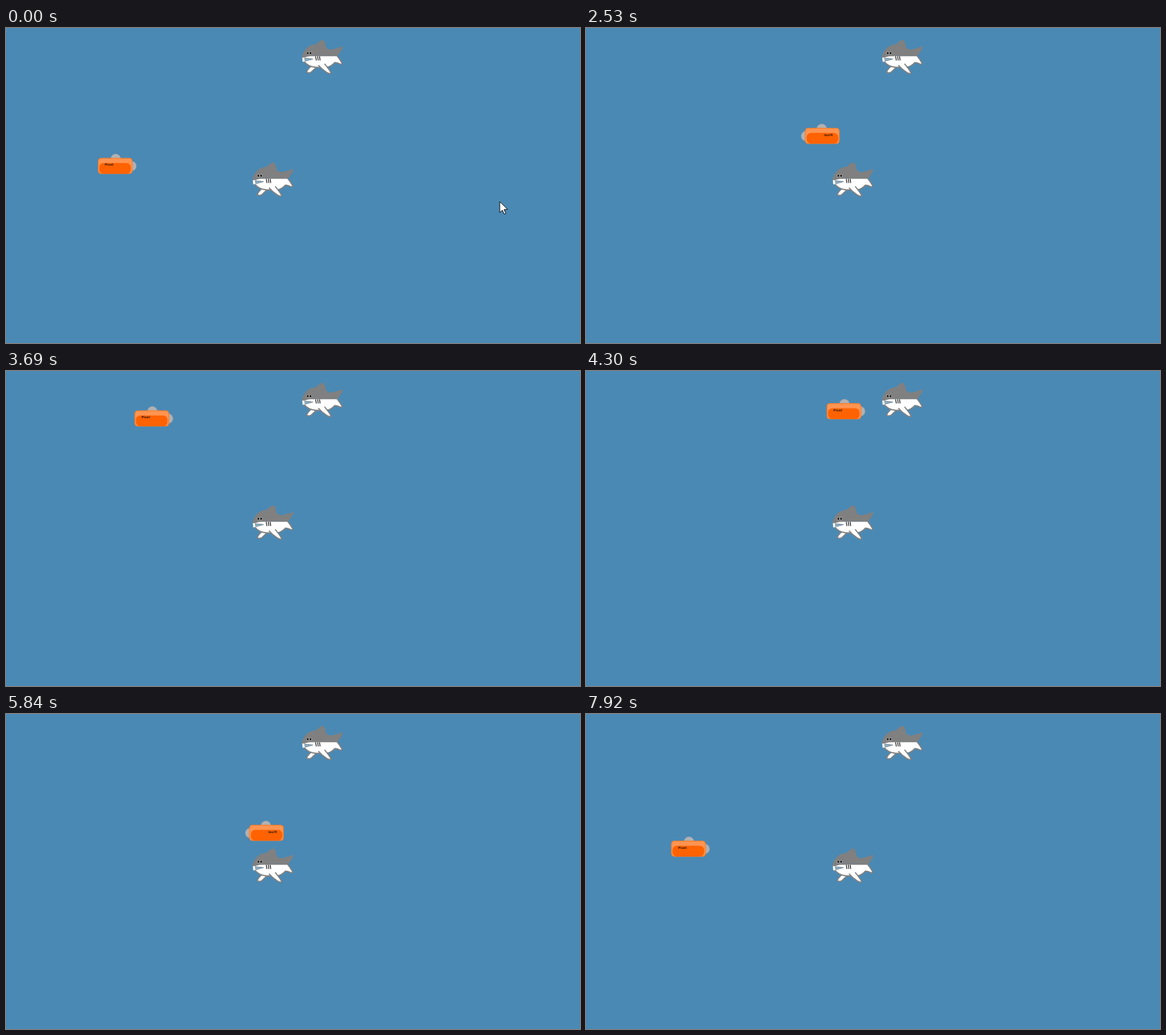
Recreate the animation shown at these times as an HTML page. Size 837x460 px, loop 7990 ms.

```html
<!DOCTYPE html>
<html lang="en">
<head>
<meta charset="utf-8">
<title>Submarine and sharks</title>
<style>
  html, body { margin: 0; width: 100%; height: 100%; overflow: hidden; background: #4a89b4; }
  svg { display: block; width: 837px; height: 460px; }
  .skin { fill: #fff; stroke: #808080; stroke-width: 1.7; stroke-linejoin: round; }
  .glass { fill: #b1b1b3; stroke: #a2a2a4; stroke-width: .6; }
  text { font: bold 4.6px "DejaVu Sans", sans-serif; fill: #3a1c08; }
</style>
</head>
<body>
<svg viewBox="0 0 837 460">
  <defs>
    <g id="shark">
      <path class="skin" d="M14 38Q8 43 7 47Q9 49 13 47.500L21 40Z"/>
      <path class="skin" d="M2 23H51Q55 28 58.500 34Q58 36 56 35.500Q52 33 48 33Q43 39 36 40H20Q8 39 3 31Z"/>
      <path class="skin" d="M24 37Q29 43 36 47.500Q40 50 42.500 49Q42 46 33 35"/>
      <path fill="#808080" d="M0 25Q1 17 8 11Q14 6.500 21 6.500Q26 0 31 0Q34 3 35 11Q39 15 44 14Q52 12 60 9.500Q57 18 51 24L46 22.500H20Q10 23 0 27Z"/>
      <path fill="#8fb3c9" stroke="#657580" stroke-width=".8" d="M3 26.500L16 28L5 31Z"/>
      <path fill="#fff" d="M.5 26H3.500L4 32H1Z"/>
      <g fill="#111" stroke="#b5b5b5" stroke-width=".8">
        <ellipse cx="8.500" cy="19.500" rx="1.800" ry="2"/>
        <ellipse cx="12.500" cy="19.500" rx="1.800" ry="2"/>
      </g>
      <path fill="none" stroke="#222" stroke-width="1.200" d="M20 24l1 6m2-6l.8 6m1.900-6l.8 6"/>
    </g>
  </defs>
  <rect width="837" height="460" fill="#4a89b4"/>
  <g id="sub">
    <circle class="glass" cx="27" cy="7.500" r="7.200"/>
    <circle class="glass" cx="49.800" cy="18" r="7.200"/>
    <rect x="1.500" y="6.500" width="49.500" height="22.500" rx="4" fill="#ff9450" stroke="#fb7a23"/>
    <rect x="3" y="13.500" width="46" height="15.500" rx="6" fill="#ff6200"/>
    <text x="11" y="17.700">Pixel</text>
  </g>
  <use href="#shark" x="431.500" y="17.300"/>
  <use href="#shark" x="359.500" y="196.300"/>
  <path id="cursor" fill="#fff" stroke="#111" stroke-linejoin="round"
        d="M.5 .5V16.500L4.300 13L7 19L9.300 18L6.800 12H12Z"/>
</svg>
<script>
  const LOOP = 7990;
  const STEP = LOOP / 104;
  const SPEED = 0.266;   // px per ms while a key is held
  const DRIFT = 0.0173;  // steady rise, px per ms
  const start = { x: 133, y: 183.7 };
  const sub = document.getElementById("sub");
  const cursor = document.getElementById("cursor");

  // Key presses: direction, time pressed, time held.
  const steering = [[1, 1465, 685], [-1, 2528, 622], [1, 3550, 920],
    [-1, 5666, 716], [-1, 7275, 342], [1, 7875, 115]];
  const diving = [[-1, 3190, 257], [1, 4640, 50], [1, 4900, 46], [1, 5225, 436],
    [1, 6400, 353], [-1, 7560, 50], [-1, 7690, 81]];

  const clamp = (value, low, high) => Math.min(high, Math.max(low, value));

  const travel = (presses, t) => SPEED * presses.reduce(
    (sum, [direction, from, held]) => sum + direction * clamp(t - from, 0, held), 0);

  function heading(t) {
    const pressed = steering.filter(([, from]) => from <= t);
    return pressed.length ? pressed[pressed.length - 1][0] : 1;
  }

  function draw() {
    const now = performance.now() % LOOP;
    const t = Math.min(103, Math.floor((now + 7) / STEP)) * STEP;
    const x = start.x + travel(steering, t);
    const y = start.y - DRIFT * t + travel(diving, t);
    const facing = heading(t);
    sub.setAttribute("transform",
      `translate(${facing > 0 ? x : x + 57.5} ${y}) scale(${facing} 1)`);
    cursor.setAttribute("transform",
      `translate(${719.5 + 0.4 * clamp(t - 70, 0, 240)} 253)`);
    cursor.style.display = t < 320 ? "" : "none";
    requestAnimationFrame(draw);
  }
  draw();
</script>
</body>
</html>
```
